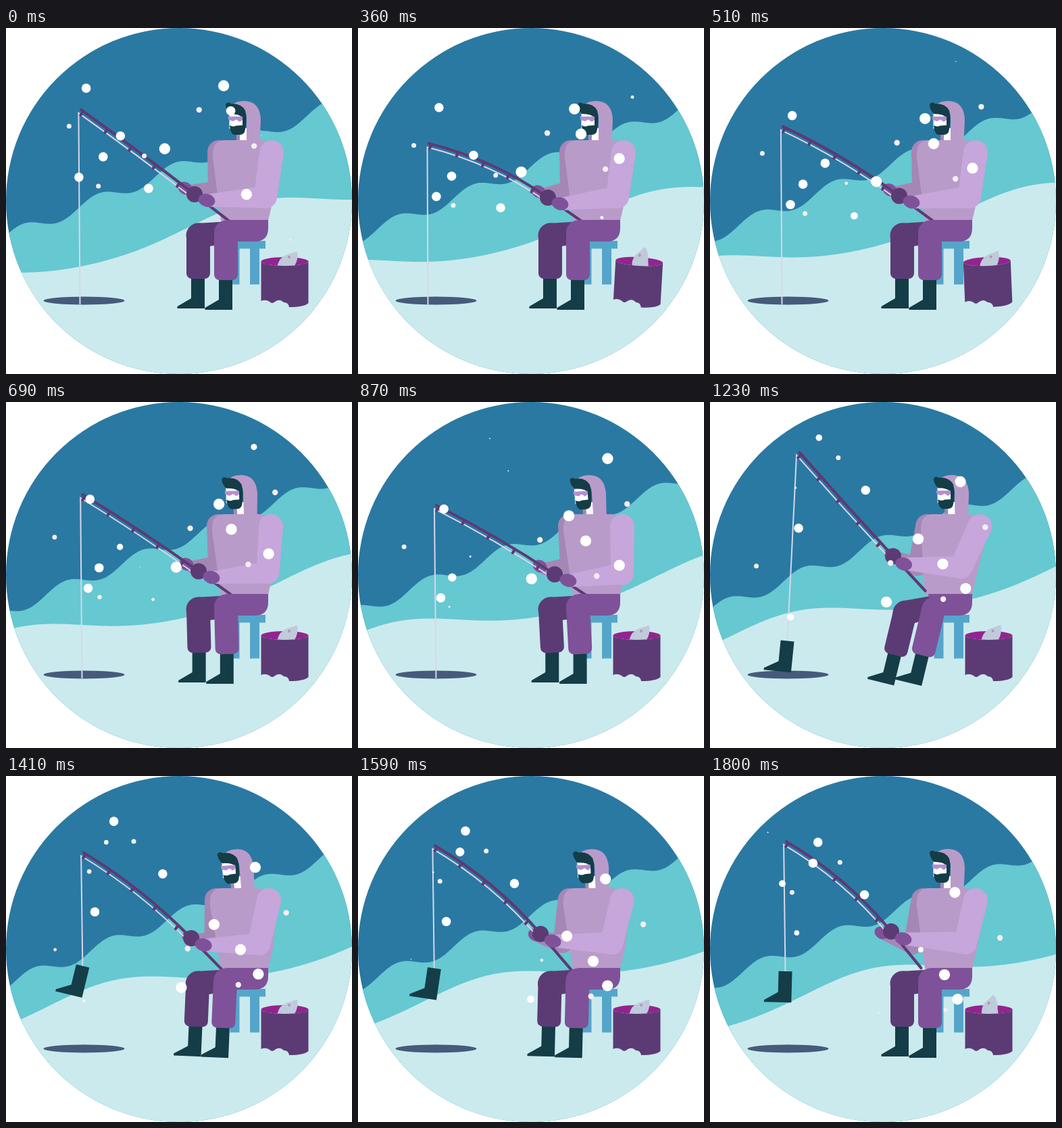
Write an HTML page with a canvas that moves like this. It is 512 by 512 pixels and loops after 1.83 s.

```html
<!DOCTYPE html>
<html lang="en">
<head>
<meta charset="utf-8">
<title>Ice fishing</title>
<style>
html, body { margin: 0; height: 100%; overflow: hidden; background: #fff; }
canvas { display: block; width: 100vw; height: 100vh; }
</style>
</head>
<body>
<canvas width="512" height="512"></canvas>
<script>
const ctx = document.querySelector('canvas').getContext('2d');
const LOOP = 1830, STEP = 30, TURN = 2 * Math.PI;

const C = {
  sky: '#2a79a3', hill: '#66c8d1', ice: '#cbeaed', hole: '#465b7b',
  coat: '#b99bc9', coatDark: '#a587b5', sleeve: '#c6a6db',
  plum: '#5c3b75', violet: '#7f5199', dark: '#143d47',
  stool: '#55a5ca', magenta: '#93248f', fish: '#bfcadb', line: '#d9d6ea'
};

// Smooth step from 0 to 1, and a rise to 1 that falls back to 0
function ease(t, from, to) {
  const u = Math.min(1, Math.max(0, (t - from) / (to - from)));
  return (1 - Math.cos(Math.PI * u)) / 2;
}
const bump = (t, from, peak, to) => ease(t, from, peak) - ease(t, peak, to);

// Every part follows a handful of overlapping actions
function poseAt(t) {
  const tug = bump(t, 0, 360, 660);
  const wind = bump(t, 510, 870, 1080);
  const lean = bump(t, 870, 1080, 1410);
  const sway = bump(t, 1080, 1410, 1800);
  const late = ease(t, 1080, 1800);
  const hand = {
    x: 279 + 2 * tug + 12 * wind - 12 * lean - 11 * late,
    y: 246 + 5 * tug + 9 * wind - 29 * lean - 16 * late + sway
  };
  return {
    hand,
    tip: {
      x: 111 - 6 * tug + 5 * wind + 35 * lean + 3 * sway + 2 * late,
      y: 121 + 50 * tug + 32 * wind - 79 * lean + 3 * sway - 24 * late
    },
    bow: 1 + 8 * tug + 2 * wind - 6 * lean + 2 * sway + 8 * late,
    glove: { x: hand.x + 18 + 2 * wind - 4 * lean, y: hand.y + 9 + 4 * lean + 2 * late },
    farGlove: {
      x: hand.x - 14 - 8 * wind + 12 * lean + 11 * sway,
      y: hand.y - 9 - 3 * wind + 8 * lean + 3 * sway + 11 * late
    },
    elbow: { x: 384 + 7 * wind - 16 * lean - 7 * sway - 6 * late, y: 250 + 4 * wind - 9 * lean - 3 * late },
    farElbow: { x: 313 - 8 * lean - 13 * late, y: 240 + 3 * wind + 4 * lean + 10 * late },
    shift: 14 * lean - 2 * wind - 4 * sway,
    head: { x: 17 * lean - 8 * (wind + sway), turn: 3 * lean - 4 * wind - 5 * sway },
    knee: { x: 10 * lean - sway, y: 7 * lean, turn: 22 * lean - 3 * wind + 2.5 * sway },
    hook: {
      x: 109.5 - 6 * tug + 6 * (wind + lean) + 3 * sway + 2 * late,
      y: 409 - 127 * ease(t, 1080, 1410) + 8 * ease(t, 1410, 1800),
      turn: 13 * sway + 1.5 * late
    },
    tilt: 3.3 * bump(t, 270, 360, 435) - 2.4 * bump(t, 435, 510, 620),
    flop: Math.max(0, -Math.cos(TURN * t / 720)) ** 2
  };
}

function shape(color, d) {
  ctx.fillStyle = color;
  ctx.fill(new Path2D(d));
}

function oval(color, x, y, rx, ry = rx, turn = 0) {
  ctx.fillStyle = color;
  ctx.beginPath();
  ctx.ellipse(x, y, rx, ry, turn, 0, TURN);
  ctx.fill();
}

function box(color, x, y, w, h) {
  ctx.fillStyle = color;
  ctx.fillRect(x, y, w, h);
}

function limb(color, a, ar, b, br) {
  const d = Math.atan2(b.y - a.y, b.x - a.x), q = Math.PI / 2;
  ctx.fillStyle = color;
  ctx.beginPath();
  ctx.arc(a.x, a.y, ar, d + q, d + 3 * q);
  ctx.arc(b.x, b.y, br, d - q, d + q);
  ctx.fill();
}

function placed(x, y, deg, draw) {
  ctx.save();
  ctx.translate(x, y);
  ctx.rotate(deg * TURN / 360);
  draw();
  ctx.restore();
}

function wave(color, height) {
  ctx.fillStyle = color;
  ctx.beginPath();
  ctx.moveTo(0, 512);
  for (let x = 0; x <= 512; x += 2) ctx.lineTo(x, height(x));
  ctx.lineTo(512, 512);
  ctx.fill();
}

function landscape(t) {
  const w = TURN / 1220;
  wave(C.hill, x => 307 - .4024 * (x - 6) + 9.6 * Math.cos(w * (t - 420) - .0559 * (x - 6)));
  wave(C.ice, x => {
    const a = w / 2 * (t - 690) - .01282 * (x - 15);
    return 356 - .22 * (x - 15) - 20 * Math.cos(a) - 2 * Math.cos(2 * a);
  });
  oval(C.hole, 115.5, 403.5, 60, 6);
}

function bucket({ tilt, flop }) {
  placed(412, 410, tilt, () => {
    ctx.translate(-412, -410);
    oval(C.magenta, 412.5, 345.5, 35, 6.5);
    placed(414, 352 - 2 * flop, -27 * flop, () => {
      shape(C.fish, 'M-12-2Q-9-12 0-16L17-21.500Q19-10 13 0L10 8L-10 8Z');
      oval('#b394b8', 5, -13, 2);
    });
    shape(C.plum, 'M377.500 345.500A35 6.500 0 0 0 447.500 345.500L447.500 407Q441 413 419 413' +
      'Q418 406 411 406Q405 400 398 405Q394 409 390 405Q384 401 377.500 404Z');
  });
}

function stool() {
  box(C.stool, 331.5, 320, 14, 59.5);
  box(C.stool, 361, 320, 14, 59.5);
  box(C.stool, 331, 315, 53, 11.5);
}

function boot() {
  shape(C.dark, 'M-10-1H10V45H-30.500V42L-10 30Z');
}

function shin(color, x, y, turn, length) {
  placed(x, y, turn, () => {
    placed(-.5, length - 1, Math.max(0, -turn), boot);
    ctx.fillStyle = color;
    ctx.beginPath();
    ctx.roundRect(-17.5, -18.5, 35, length + 18.5, [18, 16, 8, 8]);
    ctx.fill();
  });
}

function legs({ knee }) {
  const far = { x: 284.5 + knee.x * .75, y: 307 + knee.y * 1.3 };
  const x = 325.5 + knee.x;
  shin(C.plum, far.x, far.y, knee.turn, 64);
  limb(C.plum, far, 18, { x: 335, y: 302 }, 16);
  shin(C.violet, x, 303 + knee.y, knee.turn, 70);
  shape(C.violet, `M${x - knee.y * 2} 284H388V296Q388 316 368 316H${x}Z`);
}

function head({ head }) {
  placed(355 + head.x, 165, head.turn, () => {
    ctx.translate(-355, -165);
    box('#fff', 345, 148, 12, 19);
    box(C.coatDark, 341, 154, 5, 13);
    shape(C.coat, 'M335 114Q340 108 352 108Q376 108 377 136L375.500 168H356V130Q352 115 335 114Z');
    box('#fff', 330.5, 122, 22, 27);
    shape(C.dark, 'M325 113Q328 108 333 112Q348 111 354 122Q357 134 354 150Q353 158 346 158' +
      'H338Q332 157 331 144Q336 147 341 144.500L350 144V133Q346 127 331 127Q325 120 325 113Z');
    shape('#b48fd0', 'M328.500 131H350V136L346 139L341 135.500L336 138L329.500 136Z');
  });
}

function rod({ hand, tip, bow, hook }) {
  const len = Math.hypot(hand.x - tip.x, hand.y - tip.y);
  const nx = (hand.y - tip.y) / len, ny = (tip.x - hand.x) / len;   // unit normal, up and right
  const cx = (hand.x + tip.x) / 2 + nx * 2 * bow, cy = (hand.y + tip.y) / 2 + ny * 2 * bow;
  const reach = 70 / Math.hypot(hand.x - cx, hand.y - cy);
  const ox = -nx * 6, oy = -ny * 6;

  ctx.lineWidth = 2;
  ctx.strokeStyle = C.line;
  ctx.beginPath();
  ctx.moveTo(hand.x + ox, hand.y + oy);
  ctx.quadraticCurveTo(cx + ox, cy + oy, tip.x + ox, tip.y + oy);
  ctx.lineTo(hook.x, hook.y);
  ctx.stroke();

  ctx.lineWidth = 4.2;
  ctx.strokeStyle = C.plum;
  ctx.lineCap = 'round';
  ctx.beginPath();
  ctx.moveTo(hand.x + (hand.x - cx) * reach, hand.y + (hand.y - cy) * reach);
  ctx.lineTo(hand.x, hand.y);
  ctx.quadraticCurveTo(cx, cy, tip.x, tip.y);
  for (let u = .02; u < .9; u += .212) {
    const v = 1 - u;
    const x = v * v * tip.x + 2 * u * v * cx + u * u * hand.x;
    const y = v * v * tip.y + 2 * u * v * cy + u * u * hand.y;
    ctx.moveTo(x, y);
    ctx.lineTo(x + ox * 1.1, y + oy * 1.1);
  }
  ctx.stroke();
  ctx.lineCap = 'butt';
}

function man(p) {
  const { hand, glove, farGlove, shift: s } = p;
  limb(C.coatDark, { x: 315 + s, y: 183 }, 17, p.farElbow, 14);
  limb(C.coatDark, p.farElbow, 14, { x: farGlove.x + 8, y: farGlove.y + 4 }, 9);
  head(p);
  shape(C.coat, `M${322 + s} 166H${378 + s}Q${400 + s} 168 ${404 + s} 195L396 250L388 285H318` +
    `L${306 + s} 192Q${304 + s} 167 ${322 + s} 166Z`);
  oval(C.violet, farGlove.x, farGlove.y, 11, 9, .5);
  rod(p);
  legs(p);
  oval(C.plum, hand.x, hand.y, 12);
  limb(C.sleeve, { x: 393 + s, y: 184 }, 18, p.elbow, 17);
  limb(C.sleeve, p.elbow, 16.5, { x: glove.x + 5, y: glove.y }, 9.5);
  oval(C.violet, glove.x, glove.y, 12.5, 9.5, .25);
}

function caughtBoot({ hook }) {
  ctx.save();
  ctx.beginPath();
  ctx.rect(0, 0, 512, 405);
  ctx.clip();
  placed(hook.x, hook.y, hook.turn, boot);
  ctx.restore();
}

// Flakes recur forever; each has a birth place, birth time and sideways swing
const LIFE = 2576, FALL = 204.5;
const FLAKES = [
  [221, 98, 820, 11], [165, 31, 955, -6], [145, 83, 1220, 7.5], [113, 137, 1520, -9.5], [125, 45, 2020, -6.5],
  [197, 46, 770, -8], [131, 112, 1040, -10], [81.5, 74, 1680, 14.5]
];

function snow(t) {
  FLAKES.forEach(([x, y, birth, swing], i) => {
    const age = ((t - birth) / LIFE % 1 + 1) % 1;
    const small = i > 4;
    const size = (small ? 3.5 : 6.8) * Math.min(1, age / .15, (1 - age) / .15);
    oval(small ? '#f6eef1' : '#fff', x + swing * Math.sin(TURN * age), y + FALL * age, size);
  });
}

// The nearer layer is the same snowfall: mirrored, larger and later
function nearSnow(t) {
  ctx.save();
  ctx.translate(513, -8);
  ctx.scale(-1.2, 1.2);
  snow(t - 1030);
  ctx.restore();
}

function draw(t) {
  const p = poseAt(t);
  ctx.clearRect(0, 0, 512, 512);
  ctx.save();
  oval(C.sky, 256, 256, 256);
  ctx.clip();
  landscape(t);
  bucket(p);
  stool();
  man(p);
  if (t > 1080) caughtBoot(p);
  snow(t);
  nearSnow(t);
  ctx.restore();
}

const start = performance.now();
function tick() {
  const t = (performance.now() - start) % LOOP;
  draw(Math.floor(t / STEP) * STEP);
  requestAnimationFrame(tick);
}
tick();
</script>
</body>
</html>
```
